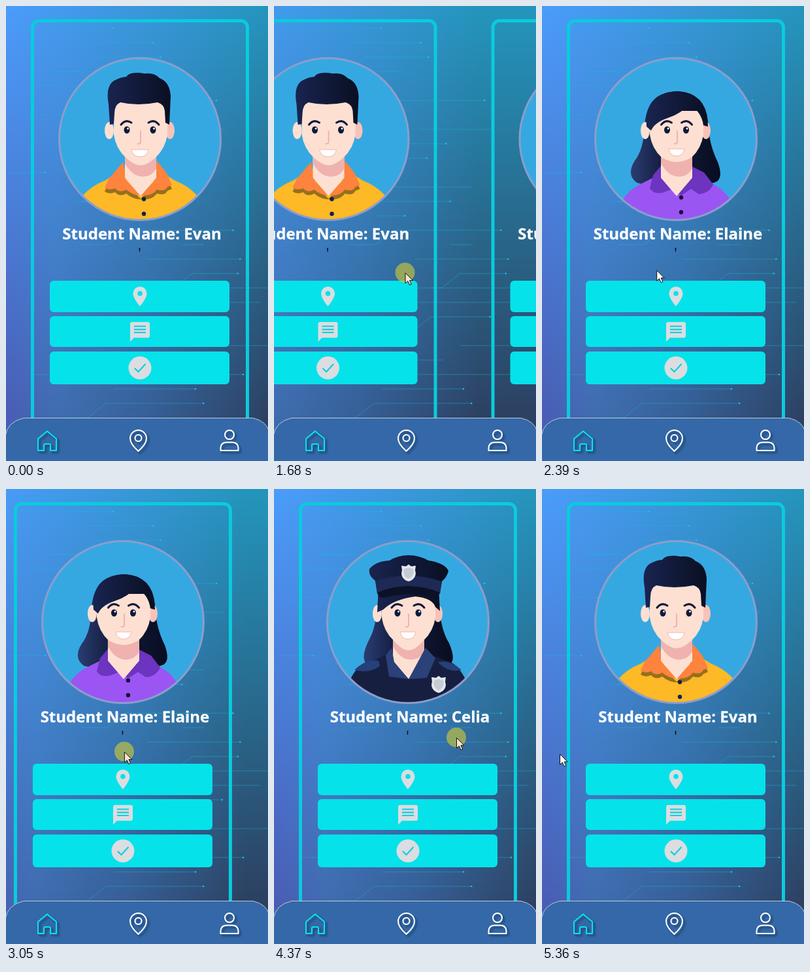
An HTML page for the animation above (5880 ms loop, 401 by 694 pixels).

```html
<!DOCTYPE html>
<html lang="en">
<head>
<meta charset="utf-8">
<title>Student cards</title>
<style>
html, body { margin: 0; width: 100%; height: 100%; overflow: hidden; background: #3468a8; }
svg { display: block; width: 100%; height: 100%; }
.name { font: 700 24px "Open Sans", "Noto Sans", sans-serif; fill: #fff; stroke: #fff; stroke-width: .3; text-anchor: middle; }
.wire { fill: none; stroke: #19b9dc; opacity: .45; }
.ink { fill: none; stroke: #10183a; stroke-width: 3; stroke-linecap: round; }
.nav { fill: none; stroke: #fff; stroke-width: 2; stroke-linejoin: round; filter: url(#drop); }
</style>
</head>
<body>
<svg viewBox="0 0 401 694" preserveAspectRatio="none">
  <defs>
    <linearGradient id="top" gradientUnits="userSpaceOnUse" x1="-120" x2="401">
      <stop offset="0" stop-color="#3a8ade"/>
      <stop offset=".24" stop-color="#4c9cfb"/>
      <stop offset=".62" stop-color="#3a98dc"/>
      <stop offset="1" stop-color="#2496bd"/>
    </linearGradient>
    <linearGradient id="low" gradientUnits="userSpaceOnUse" x1="-120" x2="401">
      <stop offset="0" stop-color="#3c78c0"/>
      <stop offset=".23" stop-color="#4b5cb6"/>
      <stop offset=".38" stop-color="#406db0"/>
      <stop offset=".65" stop-color="#365f96"/>
      <stop offset="1" stop-color="#2d4162"/>
    </linearGradient>
    <linearGradient id="fade" x2="0" y2="1">
      <stop offset="0" stop-color="#000"/>
      <stop offset=".9" stop-color="#fff"/>
    </linearGradient>
    <mask id="down"><rect x="-300" width="1000" height="694" fill="url(#fade)"/></mask>
    <linearGradient id="hair">
      <stop offset="0" stop-color="#192450"/>
      <stop offset="1" stop-color="#0a0f22"/>
    </linearGradient>
    <linearGradient id="locks">
      <stop offset="0" stop-color="#2a3d72"/>
      <stop offset=".35" stop-color="#141d40"/>
      <stop offset="1" stop-color="#080d20"/>
    </linearGradient>
    <clipPath id="disc"><circle cx="205" cy="203" r="123"/></clipPath>
    <filter id="drop" x="-30%" y="-30%" width="170%" height="170%">
      <feDropShadow dx="3" dy="3" stdDeviation="1.5" flood-color="#0b2038" flood-opacity=".55"/>
    </filter>
    <g id="badge">
      <path d="M0-13 4-10 11-11 10-4C13 4 8 11 0 13-8 11-13 4-10-4L-11-11-4-10Z" fill="#e4e7ec"/>
      <path d="M0-8 7-6C9 2 5 7 0 9-5 7-9 2-7-6Z" fill="#c6cbd4"/>
    </g>
    <g id="actions">
      <g fill="#06e2ea">
        <rect x="67" y="419" width="275" height="48" rx="6"/>
        <rect x="67" y="473" width="275" height="47" rx="6"/>
        <rect x="67" y="527" width="275" height="50" rx="6"/>
      </g>
      <g fill="#dbdde1">
        <path fill-rule="evenodd" d="M205 428a10.5 10.5 0 0 0-10.5 10.5c0 7.5 10.5 19.5 10.5 19.5s10.5-12 10.5-19.5A10.5 10.5 0 0 0 205 428zm0 6.7a3.8 3.8 0 1 1 0 7.6 3.8 3.8 0 0 1 0-7.6z"/>
        <path d="M193 482H217a3 3 0 0 1 3 3V503a3 3 0 0 1-3 3H196L190 512V485a3 3 0 0 1 3-3z"/>
        <circle cx="205" cy="552" r="17.5"/>
      </g>
      <path d="M196 488.5H214M196 493.3H214M196 498H214M197 552.5 202.5 558 213.5 546" fill="none" stroke="#10cfd9" stroke-width="2.2"/>
    </g>
  </defs>

  <g id="sky">
    <rect x="-300" width="1000" height="694" fill="url(#top)"/>
    <rect x="-300" width="1000" height="694" fill="url(#low)" mask="url(#down)"/>
  </g>
  <g id="wires"></g>
  <g id="cards"></g>

  <path d="M-1 700V656Q2 634 27 628.5H378Q399 633 403 650V700Z" fill="#3468a8" stroke="#bcc8d8"/>
  <path class="nav" style="stroke:#06e5ec" d="M49 660 63 648.5 77 660V678H68V670Q68 668 66 668H60Q58 668 58 670V678H49Z"/>
  <g class="nav">
    <path d="M202.500 647a12.5 12.500 0 0 0-12.500 12.500c0 8.500 8 15.500 12.500 19.500 4.500-4 12.500-11 12.500-19.500A12.500 12.500 0 0 0 202.500 647z"/>
    <circle cx="202.500" cy="659" r="5"/>
  </g>
  <g class="nav">
    <circle cx="342" cy="654" r="7"/>
    <path d="M328.500 678V674Q329 665.500 338 665.500H346Q355 665.500 355.500 674V678Z"/>
  </g>

  <g id="cursor">
    <circle id="press" r="15" fill="#d7cd32" opacity=".6"/>
    <path id="arrow" d="M.5.5V16.500L4.300 13 7 19 9.700 17.800 7 12H12Z" stroke="#111"/>
  </g>
</svg>
<script>
const LOOP = 5880, PITCH = 417, SNAP = 300, FRAME = 65.8, SHOW = 440, ANCHOR = 1470;
const SKIN = '#fde0d2', BLUSH = '#f0b2ae';
const $ = id => document.getElementById(id);

const shape = (fill, d, more = '') => `<path d="${d}" fill="${fill}" ${more}/>`;

// Eyes, brows, nose and mouth shared by the three portraits
function features(cx, gap, mouthY, wide) {
  const side = s => {
    const x = cx + s * gap;
    return `<ellipse cx="${x}" cy="189" rx="4.500" ry="5.500" fill="#10183a"/>
      <circle cx="${x + 1.500}" cy="187" r="1.400" fill="#fff"/>
      <path class="ink" d="M${x - s * 7} 178Q${x + s * 2} 172 ${x + s * 9} 181"/>`;
  };
  return side(-1) + side(1) +
    shape('none', `M${cx + 1} 190V208Q${cx} 211 ${cx - 4} 210`, `stroke="${BLUSH}" stroke-width="2"`) +
    shape('#fff', `M${cx - wide} ${mouthY}h${2 * wide}q-2 11-${wide} 11t-${wide}-11Z`, 'stroke="#f3a9a0" stroke-width=".8"');
}

const head = (top, chin) => `
  <ellipse cx="158" cy="190" rx="7" ry="13" fill="${SKIN}"/>
  <ellipse cx="251" cy="190" rx="7" ry="13" fill="#f7c3b8"/>` +
  shape(SKIN, 'M182 228V262L206 290 230 262V228Z') +
  shape(BLUSH, 'M182 226H230V248Q222 262 206 260 192 258 182 240Z') +
  shape(SKIN, `M165 ${top}H247V196Q244 217 229 231 216 ${chin} 206 ${chin} 196 ${chin} 183 231 168 217 165 196Z`);

const buttons = (x, y, color) =>
  [y, y + 22.5].map(v => `<circle cx="${x}" cy="${v}" r="3.200" fill="${color}"/>`).join('');

const collar = 'M179 238 157 264 151 277Q158 282 167 278 174 286 184 280 194 289 208 289 224 290 231 280 243 284 247 276L254 273 246 255 231 236 226 268 206 288 186 268Z';

const man =
  shape('#fdb926', 'M100 330Q106 284 152 266L180 248H230L258 266Q304 284 310 330Z') +
  shape('#96701c', collar, 'transform="translate(0 6)"') +
  shape('#fd833e', collar) +
  head(145, 243) +
  shape('url(#hair)', 'M159 181 157 150Q152 123 165 114 176 108 184 108 190 99 212 103 227 101 235 110 251 116 252 138L250 181 244 178 243 160Q242 150 232 147 202 153 175 147 166 151 166 164L165 180Z') +
  buttons(211, 294.5, '#14204a') +
  features(205, 20, 219, 13);

const woman =
  shape('url(#locks)', 'M207 130Q160 132 157 182 156 218 142 236 128 258 146 270L200 280 260 270Q280 268 269 238 255 210 254 176 250 132 207 130Z') +
  shape('#9b55f2', 'M112 330Q118 290 146 274L178 258H238L266 274Q294 290 298 330Z') +
  shape('#6c34bf', 'M182 244 170 258 165 278Q170 287 184 285L200 279 213 289 228 279 240 287Q256 286 262 272L248 254 230 245Z') +
  head(160, 238) +
  shape('url(#hair)', 'M160 184Q156 132 207 130 252 132 254 184L247 182Q244 160 224 150 214 164 192 171 172 178 167 190Z') +
  buttons(213, 292, '#170f30') +
  features(206, 14.5, 218, 12);

const officer =
  shape('url(#locks)', 'M160 155Q158 205 148 225 128 262 146 270L205 284 262 270Q282 268 268 235 252 210 252 155Z') +
  shape('#161f40', 'M104 330Q114 284 132 270L175 252H238L274 266Q296 282 306 330Z') +
  shape('#26407a', 'M123 276Q142 258 160 262L162 270Q146 282 123 276ZM251 264Q270 260 287 276 266 281 251 264Z') +
  head(158, 246) +
  shape('#2b4179', 'M180 242 171 254 176 286 206 290 184 264ZM232 242 206 290 234 288 247 258Z') +
  `<use href="#badge" x="252" y="298"/>` +
  shape('url(#hair)', 'M158 188 160 150H252L254 186 247 180Q242 166 216 164 184 168 167 184Z') +
  shape('url(#hair)', 'M158 158 155 140Q144 132 146 122 156 110 177 109 190 101 206 101 222 101 236 109 262 113 267 125 265 134 257 141L254 158Z') +
  shape('#1e2a55', 'M155 140Q206 124 257 141L254 160Q206 140 158 160Z') +
  shape('#0b1126', 'M158 158Q206 138 254 158 250 168 240 165 206 156 172 165 160 168 158 158Z') +
  `<use href="#badge" x="206" y="128"/>` +
  features(205, 16, 218, 12);

const card = (portrait, name) => `<g>
  <rect x="40.500" y="22.500" width="329" height="660" rx="10" fill="none" stroke="#09ccdd" stroke-width="5"/>
  <g clip-path="url(#disc)"><rect x="80" y="78" width="250" height="250" fill="#36a8e1"/>${portrait}</g>
  <circle cx="205" cy="203" r="123.500" fill="none" stroke="#8c9dcb" stroke-width="3"/>
  <text class="name" x="208" y="356">Student Name: ${name}</text>
  <path d="M203.500 369H205.500L205 375H204Z" fill="#0a0f1c"/>
  <use href="#actions"/>
</g>`;

$('cards').innerHTML = card(man, 'Evan') + card(woman, 'Elaine') + card(officer, 'Celia');
const cards = [...$('cards').children];

// Circuit traces: seeded runs, some with a diagonal lead-in, most ending in a dot
let seed = 11;
const rand = () => (seed = seed * 16807 % 2147483647) / 2147483647;
const traces = Array.from({ length: 28 }, (_, i) => {
  const y = 12 + i * 22, x = rand() * 300, end = x + 30 + rand() * 140;
  const lead = i % 3 ? '' : `l-28 ${rand() < .5 ? 22 : -22}h-40`;
  const dot = i % 4 ? `<circle cx="${end}" cy="${y}" r="1.300" fill="#12c6e6"/>` : '';
  return `<path class="wire" d="M${end} ${y}H${x}${lead}"/>${dot}`;
});
$('wires').innerHTML = traces.join('');

// Each swipe: press, drag from one point, release at another
const swipes = [
  { press: 1150, start: 1430, end: 1872, from: [323, 391], to: [95, 420] },
  { press: 2790, start: 2980, end: 3402, from: [207, 396], to: [48, 424] },
  { press: 4350, start: 4400, end: 4880, from: [279, 379], to: [27, 404] }
];
const ENTRY = [398, 470], REST = 170;

const clamp = u => Math.min(1, Math.max(0, u));
const easeOut = u => 1 - (1 - u) ** 2;
const mix = (a, b, u) => a.map((v, i) => v + (b[i] - v) * u);

function pointer(t) {
  let at = ENTRY, leave = SHOW;
  for (const { press, start, end, from, to } of swipes) {
    if (t < start) return mix(at, from, easeOut(clamp((t - leave) / (press - leave))));
    if (t < end) return mix(from, to, (t - start) / (end - start));
    at = to;
    leave = end + REST;
  }
  return at;
}

function scrolled(t) {
  return swipes.reduce((sum, { start, end, from, to }) => {
    const drag = (from[0] - to[0]) * clamp((t - start) / (end - start));
    return sum + drag + (PITCH - drag) * easeOut(clamp((t - end) / SNAP));
  }, 0);
}

// The picture advances in even ticks
const held = t => ANCHOR + Math.floor((t - ANCHOR + 16) / FRAME) * FRAME;

function draw(time) {
  const t = held(time), s = scrolled(t), ring = PITCH * cards.length;
  cards.forEach((el, i) => {
    const x = (i * PITCH - s + ring * 1.5) % ring - ring / 2;
    el.setAttribute('transform', `translate(${x.toFixed(2)})`);
  });
  const drift = -90 * Math.sin(2 * Math.PI * s / PITCH);
  $('sky').setAttribute('transform', `translate(${drift.toFixed(2)})`);

  const down = swipes.some(({ press, end }) => t >= press && t < end);
  $('cursor').setAttribute('transform', `translate(${pointer(t).map(v => v.toFixed(1))})`);
  $('cursor').setAttribute('visibility', time < SHOW ? 'hidden' : 'visible');
  $('press').setAttribute('display', down ? 'inline' : 'none');
  $('arrow').setAttribute('fill', down ? '#fde3cf' : '#fff');
}

const begin = performance.now();
function tick() {
  draw((performance.now() - begin) % LOOP);
  requestAnimationFrame(tick);
}
tick();
</script>
</body>
</html>
```
